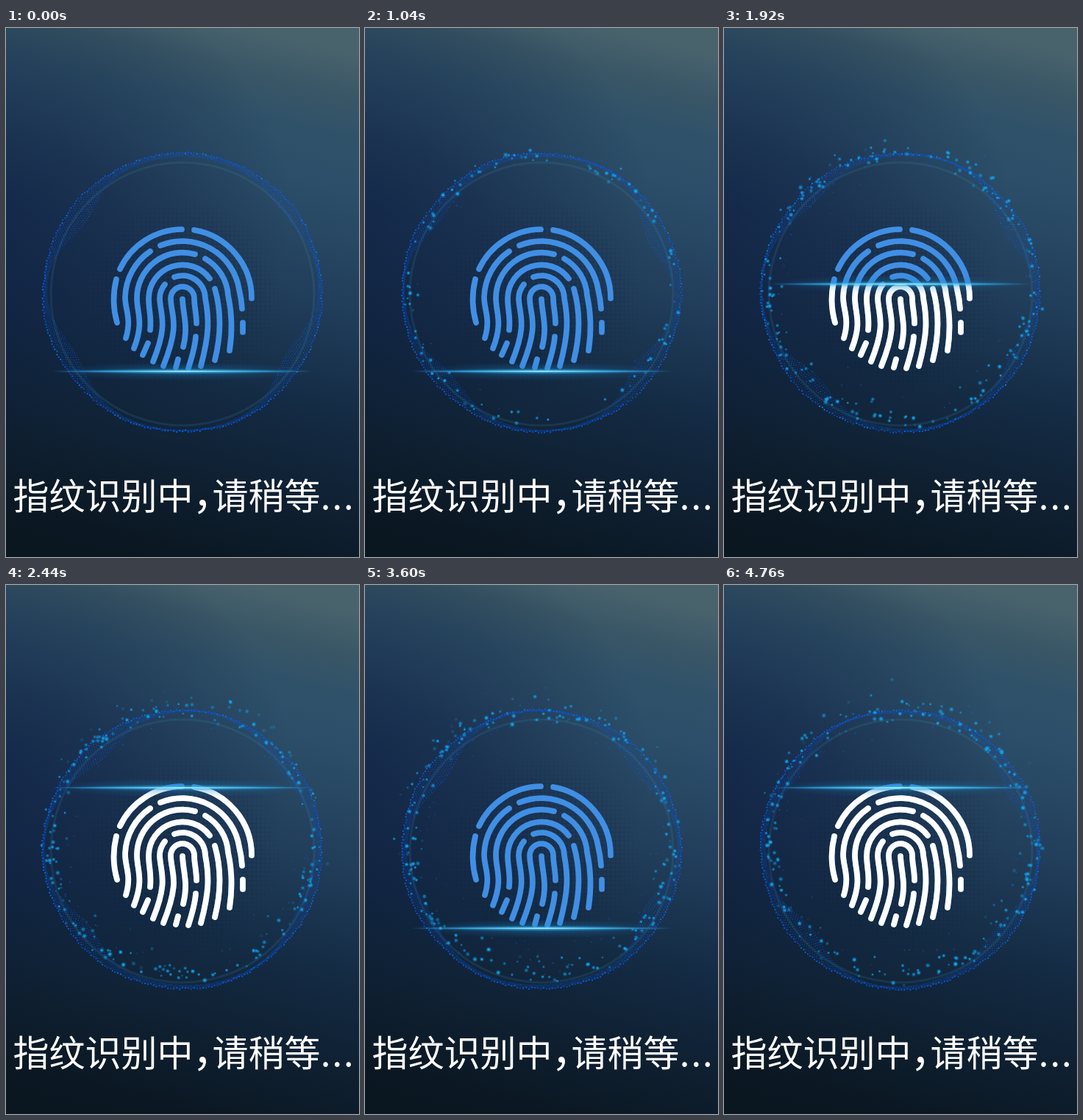
Animation, 480 px wide and 720 px high, one loop 4800 ms. Source, as an HTML page with a canvas:

```html
<!DOCTYPE html>
<html lang="zh-CN">
<head>
<meta charset="utf-8">
<style>
html, body { margin: 0; width: 100%; height: 100%; overflow: hidden; background: #0a1521; }
canvas { display: block; width: 480px; height: 720px; }
</style>
</head>
<body>
<canvas id="stage" width="480" height="720"></canvas>
<script>
const W = 480, H = 720, LOOP = 4800, STEP = 40, SWEEP = 1200, TAU = Math.PI * 2;
const CX = 240, CY = 360, RING = 189.5;
const LOW = 467.3, RISE = 198;
const ctx = document.getElementById('stage').getContext('2d');

function randomizer(seed) {
  return () => {
    seed = (seed + 0x6D2B79F5) | 0;
    let v = Math.imul(seed ^ (seed >>> 15), 1 | seed);
    v = (v + Math.imul(v ^ (v >>> 7), 61 | v)) ^ v;
    return ((v ^ (v >>> 14)) >>> 0) / 4294967296;
  };
}

function fade(gradient, stops) {
  stops.forEach(([at, color]) => gradient.addColorStop(at, color));
  return gradient;
}

// Soft ellipse: a unit radial gradient scaled to its radii.
function glow(g, x, y, rx, ry, stops) {
  g.save();
  g.translate(x, y);
  g.scale(rx, ry);
  g.fillStyle = fade(g.createRadialGradient(0, 0, 0, 0, 0, 1), stops);
  g.fillRect(-1, -1, 2, 2);
  g.restore();
}

const ridges = new Path2D([
  'M155 328A94 94 0 0 1 239 274',
  'M256 275A94 94 0 0 1 334 368',
  'M150 342C145 362 145 380 151 401',
  'M210 296A78 78 0 0 1 317 356Q320 368 321 382',
  'M322 401V414',
  'M196 304A78 78 0 0 0 162 366C162 385 171 395 163 422',
  'M257 308A62 62 0 0 0 178 368C178 388 188 400 174 436',
  'M271 314A62 62 0 0 1 302 364Q310 400 304 439',
  'M277 341A46 46 0 0 0 194 368C194 385 198 392 196 411',
  'M193 429L186 445',
  'M284 355Q297 400 284 452',
  'M229 339A31 31 0 0 1 271 368C276 395 277 415 265 460',
  'M216 349A31 31 0 0 0 209 368C210 392 221 402 200 454',
  'M259 402C259 388 256 380 256 368A16 16 0 0 0 224 368C224 392 238 400 214 460',
  'M240 369C241 392 248 405 241 434',
  'M234 451L231 462',
  'M258 420Q257 435 248 463'
].join(''));

// Everything that never moves is painted once.
function paintBackdrop() {
  const layer = document.createElement('canvas');
  layer.width = W;
  layer.height = H;
  const g = layer.getContext('2d');

  g.fillStyle = fade(g.createLinearGradient(330, 0, 150, H), [
    [0, 'rgb(73,99,109)'], [0.08, 'rgb(57,86,102)'], [0.15, 'rgb(48,82,105)'],
    [0.25, 'rgb(44,78,105)'], [0.45, 'rgb(33,62,91)'], [0.65, 'rgb(20,43,68)'],
    [0.85, 'rgb(14,30,46)'], [1, 'rgb(10,22,32)']
  ]);
  g.fillRect(0, 0, W, H);
  glow(g, -40, 250, 430, 350, [
    [0, 'rgba(10,24,60,.6)'], [0.4, 'rgba(10,24,58,.42)'], [1, 'rgba(10,24,50,0)']
  ]);

  g.fillStyle = fade(g.createRadialGradient(CX, 368, 20, CX, 368, 140), [
    [0, 'rgba(8,24,48,.24)'], [0.7, 'rgba(8,24,48,.15)'], [1, 'rgba(8,24,48,0)']
  ]);
  for (let i = -140; i <= 140; i += 6) {
    g.fillRect(CX + i, 228, 1, 280);
    g.fillRect(100, 368 + i, 280, 1);
  }

  g.strokeStyle = 'rgba(70,150,180,.15)';
  g.lineWidth = 3;
  g.beginPath();
  g.arc(CX, 362, 179, 0, TAU);
  g.stroke();

  const family = 'px "Noto Sans CJK SC", "Noto Sans CJK", sans-serif';
  g.fillStyle = '#fff';
  g.font = 49 + family;
  g.fillText('指纹识别中', 9.5, 654.5);
  g.fillText('请稍等', 280.5, 654.5);
  g.textAlign = 'center';
  for (let i = 0; i < 3; i++) g.fillText('.', 434.5 + i * 15.7, 654.5);
  g.textAlign = 'left';
  g.font = 56 + family;
  g.fillText('，', 253.5, 654.5);
  return layer;
}

const backdrop = paintBackdrop();

const rnd = randomizer(41);
const sparks = Array.from({ length: 640 }, (_, i) => ({
  birth: 150 + i * 7.2,
  life: 1700 + rnd() * 1000,
  angle: rnd() * TAU,
  radius: 173 + rnd() * 14,
  drift: (rnd() - 0.5) * 16,
  rise: 4 + rnd() * 17,
  size: 1 + rnd() * 1.1,
  strength: 0.5 + rnd() * 0.5,
  faint: rnd() < 0.2
}));

const ROWS = 9, PER_ROW = 300;
const mesh = Array.from({ length: ROWS * PER_ROW }, (_, i) => ({
  row: Math.floor(i / PER_ROW),
  angle: (i % PER_ROW) / PER_ROW * TAU,
  jitter: (rnd() - 0.5) * 2.4,
  phase: rnd() * TAU
}));

// Four folds of the mesh, on the diagonals, that sway and breathe.
const folds = [30, 143, 221, 326].map((deg, i) => ({ center: deg * TAU / 360, phase: i * 1.9 }));

function foldDepth(angle, s) {
  let depth = 3.5 + 2 * Math.sin(angle * 3 + s);
  for (const { center, phase } of folds) {
    const sway = 0.14 * Math.sin(s * 1.7 + phase);
    const off = Math.atan2(Math.sin(angle - center - sway), Math.cos(angle - center - sway));
    depth += (19 + 6 * Math.sin(s * 2.1 + phase * 2)) * Math.exp(-((off / 0.32) ** 2));
  }
  return depth;
}

function drawMesh(s) {
  for (const dot of mesh) {
    const angle = dot.angle + s * 0.06 + dot.row * 0.012;
    const depth = foldDepth(angle, s);
    const r = RING - dot.row / (ROWS - 1) * depth + dot.jitter * (dot.row ? 0.4 : 1)
      + 0.7 * Math.sin(angle * 7 + s * 2);
    const flicker = 0.8 + 0.2 * Math.sin(s * 5 + dot.phase);
    const strength = dot.row ? 0.28 + 0.34 * Math.min(1, depth / 22) : 1;
    const size = dot.row ? 1.35 : 1.9;
    ctx.globalAlpha = strength * flicker;
    ctx.fillStyle = dot.phase > 5.4 ? '#1a8cff' : '#0a5cf0';
    ctx.fillRect(CX + r * Math.cos(angle) - size / 2, CY + r * Math.sin(angle) - size / 2, size, size);
  }
  ctx.globalAlpha = 1;
}

function disc(x, y, r) {
  ctx.beginPath();
  ctx.arc(x, y, r, 0, TAU);
  ctx.fill();
}

function drawSparks(t) {
  for (const p of sparks) {
    const age = t - p.birth;
    if (age < 0 || age > p.life) continue;
    const s = age / 1000;
    const alpha = Math.min(1, age / 200, (p.life - age) / 900) * p.strength;
    const pull = p.faint ? 1 - 0.12 * s : 1;
    const x = CX + p.radius * pull * Math.cos(p.angle) + p.drift * s;
    const y = CY + p.radius * pull * Math.sin(p.angle) - p.rise * s;
    ctx.fillStyle = p.faint ? '#1c5bd8' : '#14a0e8';
    if (!p.faint) {
      ctx.globalAlpha = alpha * 0.28;
      disc(x, y, p.size * 1.7);
    }
    ctx.globalAlpha = alpha * (p.faint ? 0.6 : 1);
    disc(x, y, p.faint ? 1 : p.size);
  }
  ctx.globalAlpha = 1;
}

function scanY(t) {
  if (t < SWEEP) return LOW;
  const turn = t / SWEEP - 1;
  const part = turn % 1;
  return LOW - RISE * (Math.floor(turn) % 2 ? 1 - part : part);
}

function drawPrint(y) {
  ctx.lineWidth = 7.7;
  ctx.lineCap = 'round';
  ctx.strokeStyle = '#408fe5';
  ctx.stroke(ridges);
  ctx.save();
  ctx.beginPath();
  ctx.rect(0, y, W, H - y);
  ctx.clip();
  ctx.strokeStyle = '#fff';
  ctx.stroke(ridges);
  ctx.restore();
}

function drawBeam(y) {
  glow(ctx, CX, y, 178, 13, [
    [0, 'rgba(30,155,215,.5)'], [0.35, 'rgba(28,140,205,.28)'],
    [0.7, 'rgba(24,125,195,.12)'], [1, 'rgba(20,110,190,0)']
  ]);
  glow(ctx, CX, y, 178, 4, [
    [0, 'rgba(100,215,250,.75)'], [0.5, 'rgba(50,180,235,.5)'], [1, 'rgba(30,140,220,0)']
  ]);
  ctx.fillStyle = fade(ctx.createLinearGradient(62, 0, 418, 0), [
    [0, 'rgba(40,160,230,0)'], [0.2, 'rgba(55,185,235,.7)'], [0.5, 'rgba(175,240,255,.95)'],
    [0.8, 'rgba(55,185,235,.7)'], [1, 'rgba(40,160,230,0)']
  ]);
  ctx.fillRect(62, y - 0.8, 356, 1.6);
}

function frame() {
  const t = Math.floor(performance.now() % LOOP / STEP) * STEP;
  const y = scanY(t);
  ctx.drawImage(backdrop, 0, 0);
  drawMesh(t / 1000);
  drawSparks(t);
  drawPrint(y);
  drawBeam(y);
  requestAnimationFrame(frame);
}
frame();
</script>
</body>
</html>
```
